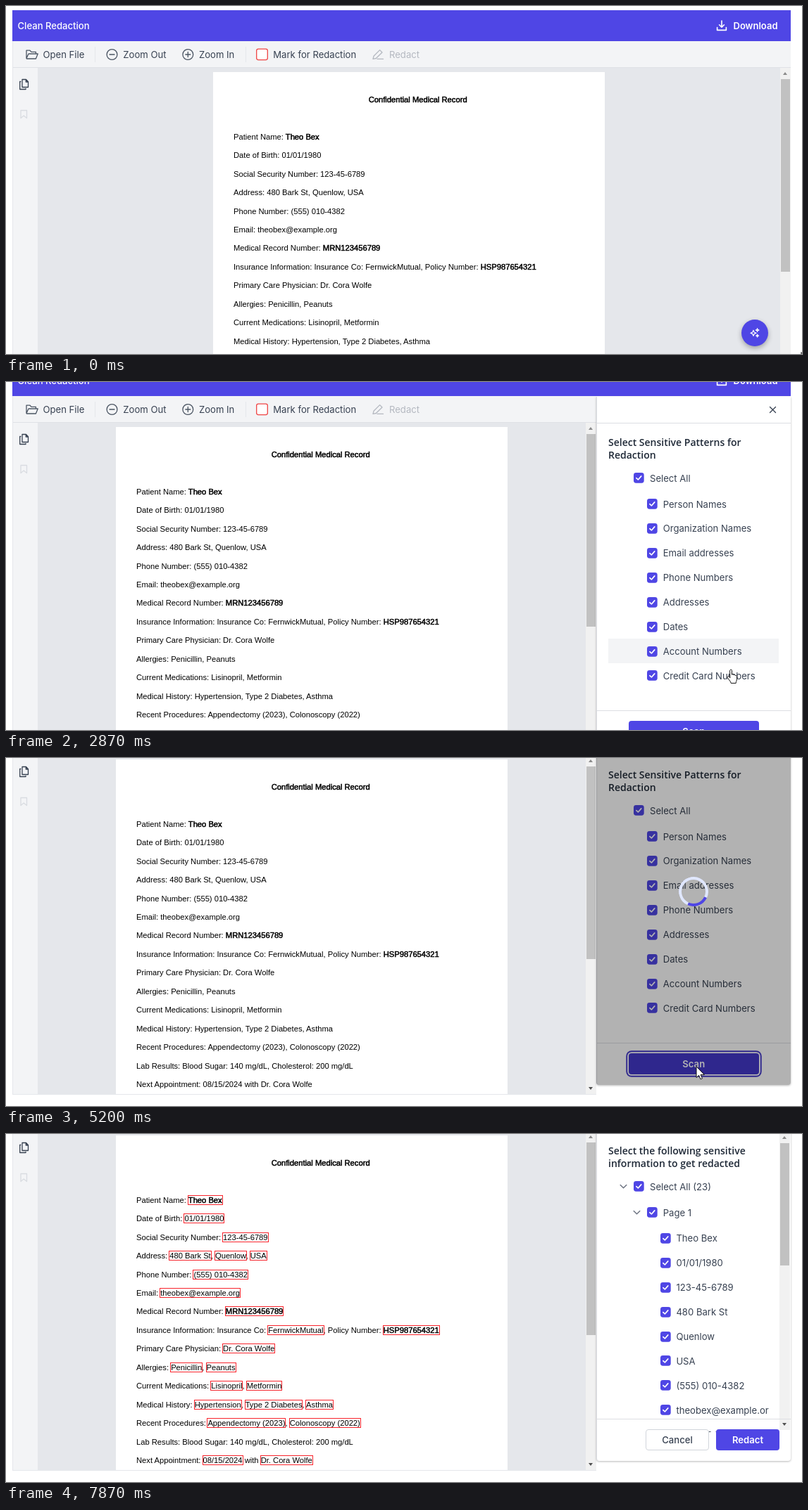
An HTML page that plays this animation: 1130 by 495 pixels, repeating every 8000 ms.

```html
<!DOCTYPE html>
<html lang="en">
<head>
<meta charset="utf-8">
<title>Redaction demo</title>
<style>
:root { --brand: #4f46e5; --dark: #4338ca; --line: #e5e7eb; --soft: #f3f4f6; --ink: #374151; }
html, body { margin: 0; width: 100%; height: 100%; overflow: hidden; background: #fff; }
body { position: relative; font: 13.1px Inter, sans-serif; color: var(--ink); }
* { box-sizing: border-box; }
svg { fill: none; stroke: currentColor; stroke-linecap: round; stroke-linejoin: round; overflow: visible; }
#app, #app > div, .abs { position: absolute; }
#app { left: 0; top: 0; width: 1130px; height: 700px; }

.header { left: 9px; top: 6px; width: 1105px; height: 44px; background: var(--brand); color: #fff; line-height: 44px; white-space: nowrap; }
.header span { position: absolute; font-weight: 500; }
.header .dl { font-weight: 600; font-size: 13px; }

.viewer { left: 9px; top: 50px; width: 1105px; height: 521px; background: #e5e7eb; overflow: hidden; border: solid var(--line); border-width: 0 0 1px 1px; }
.narrow .viewer { width: 829px; }
.tools { position: absolute; left: -1px; top: 0; width: 1105px; height: 38px; background: var(--soft); border-bottom: 1px solid #dfe1e6; line-height: 38px; white-space: nowrap; }
.tools span { position: absolute; }
.tools i { position: absolute; top: 8px; width: 1px; height: 22px; background: var(--line); }
.tools svg, .side svg { position: absolute; left: 0; top: 0; width: 1px; height: 1px; stroke-width: 1.3; color: #4b5563; }
.off { color: #b4b8c0; }
.side { position: absolute; left: -1px; top: 38px; width: 36px; height: 490px; background: var(--soft); }
.page { position: absolute; left: calc(50% - 268.5px); top: 44px; width: 556px; height: 720px; padding: 25.8px 0 0 29.5px; background: #fff; color: #000; font: 11.19px/26.45px "Liberation Sans", Arial, sans-serif; white-space: nowrap; }
.page div:first-child { padding-left: 191.7px; margin-bottom: 26.45px; }
.page b { font-weight: 400; -webkit-text-stroke: .5px #000; }
.page u { text-decoration: none; }
.done .page u { outline: 1px solid #f8232b; }

.bar { position: absolute; right: 0; width: 15px; background: #f1f1f1; }
.bar::before, .bar::after { content: ""; position: absolute; left: 4px; border: solid transparent; border-width: 0 3.5px; }
.bar::before { top: 6px; border-bottom: 4px solid #8a8a8a; }
.bar::after { bottom: 6px; border-top: 4px solid #505050; }
.bar i { position: absolute; left: 1px; right: 1px; top: 16px; background: #c1c1c1; }

.fab { left: 1044px; top: 445.5px; width: 38px; height: 38px; border-radius: 50%; background: var(--brand); color: #fff; box-shadow: 0 3px 7px rgba(0,0,0,.3); }
.over .fab { background: var(--dark); }
.focus .fab, .busy .scan { box-shadow: 0 0 0 1.84px #fff, 0 0 0 3.7px var(--dark); }

.panel { display: none; left: 838px; top: 51px; width: 276px; height: 506px; background: #fff; border-left: 1px solid #d9dbe0; border-radius: 0 0 4px 4px; box-shadow: 0 1px 3px rgba(0,0,0,.28); }
.open .panel { display: block; }
.panel > * { position: absolute; }
.rule { left: 0; width: 275px; height: 1px; background: #dcdee3; }
.list { left: -1px; top: 38px; width: 275px; height: 427px; overflow: hidden; white-space: nowrap; }
.list h2 { position: absolute; left: 17px; top: 18px; margin: 0; font: 600 14px/18px "Open Sans", "Noto Sans", sans-serif; color: #1f2937; white-space: pre; }
.row { position: absolute; left: 17px; width: 242px; height: 35px; display: flex; align-items: center; gap: 8px; }
.row svg { flex: none; width: 14.7px; height: 14.7px; }
.row .chev { position: absolute; margin-left: -22px; color: #6b7280; stroke-width: 1.4; }
.hover { background: var(--soft); }
.btn { top: 461px; height: 30px; border-radius: 4px; background: var(--brand); color: #fff; font-weight: 600; text-align: center; line-height: 30px; }
.scan { left: 45px; width: 184.5px; }
.scan.hot { background: var(--dark); }
.scan.press { background: #3730a3; }
.busy .scan { background: var(--dark); }
.cancel { left: 69px; width: 90px; background: #fff; color: var(--ink); border: 1px solid #d1d5db; font-weight: 500; line-height: 28px; }
.redact { left: 169px; width: 90px; }
.after, .done .before { display: none; }
.done .after { display: block; }
.veil { display: none; left: -1px; top: 0; width: 276px; height: 506px; background: rgba(0,0,0,.3); border-radius: 0 0 4px 4px; }
.spin { display: none; left: 116px; top: 210px; width: 42px; height: 42px; border: 4px solid #e0e7ff; border-top-color: var(--brand); border-radius: 50%; }
.busy .veil, .busy .spin { display: block; }
#cursor { position: absolute; left: 0; top: 0; width: 1px; height: 1px; fill: #fff; stroke: #111; stroke-width: 1; }
</style>
</head>
<body>
<div id="app">
  <div class="header">
    <span style="left:7.5px">Clean Redaction</span>
    <svg class="abs" style="left:1000px;top:15px" width="14" height="15" stroke-width="1.6"><path d="M7 0V9M3.6 5.8 7 9.2 10.4 5.8M.6 9.5V13.4H13.4V9.5"/></svg>
    <span class="dl" style="left:1023.5px">Download</span>
  </div>

  <div class="viewer">
    <div class="page" id="page"></div>
    <div class="side">
      <svg>
        <path stroke="#374151" d="M14 16.5H19.5L22.5 19.7V27.5H14ZM19.3 16.5V20H22.5"/>
        <path stroke="#374151" d="M11.8 19.5H10.7V30.5H19V29.5"/>
        <path stroke="#d9dce1" d="M12 60.5H20.5V71.5L16.2 68 12 71.5Z"/>
      </svg>
    </div>
    <div class="bar" style="top:38px;height:482px"><i style="height:274px"></i></div>
    <div class="tools">
      <svg>
        <path d="M20 24.5V13.2H25L27 15.4H33.4V18M20 24.5 23 18H36.2L33.4 25H20.3Z"/>
        <circle cx="141.5" cy="19" r="7.4"/><path d="M138 19H145"/>
        <circle cx="249.3" cy="19" r="7.4"/><path d="M245.8 19H252.8M249.3 15.5V22.5"/>
        <rect x="346.7" y="11.2" width="15.6" height="15.4" rx="2.5" fill="#fff" stroke="#ef4444"/>
        <path stroke="#b4b8c0" d="M512 25.3 513 21.3 521.6 12.6 525 16 516.3 24.5ZM518 25.4H526.5"/>
      </svg>
      <span style="left:43.5px">Open File</span><i style="left:117px"></i>
      <span style="left:157.3px">Zoom Out</span>
      <span style="left:265px">Zoom In</span><i style="left:331px"></i>
      <span style="left:370.3px">Mark for Redaction</span>
      <span class="off" style="left:535px">Redact</span>
    </div>
  </div>

  <div class="fab">
    <svg class="abs" style="left:12px;top:12px" width="14" height="14" stroke-width="1.2">
      <path d="M5 3.2 6.2 6 9 7.2 6.2 8.4 5 11.2 3.8 8.4 1 7.2 3.8 6ZM10.6.6 11.2 2.4 13 3 11.2 3.6 10.6 5.4 10 3.6 8.2 3 10 2.4ZM10.6 9 11.1 10.5 12.6 11 11.1 11.5 10.6 13 10.1 11.5 8.6 11 10.1 10.5Z"/>
    </svg>
  </div>

  <div class="panel">
    <div class="list before" id="patterns"></div>
    <div class="list after" id="found"></div>
    <svg style="left:245px;top:14px" width="9" height="9" stroke-width="1.3"><path d="M.5.5 8.5 8.5M8.5.5.5 8.5"/></svg>
    <div class="rule" style="top:37px"></div>
    <div class="rule" style="top:446px"></div>
    <div class="btn scan before" id="scan">Scan</div>
    <div class="btn cancel after">Cancel</div>
    <div class="btn redact after">Redact</div>
    <div class="veil"></div>
    <div class="spin" id="spin"></div>
  </div>
</div>
<svg id="cursor">
  <path id="arrow" d="M0 0V15.6L3.6 12.3 6 17.8 8.4 16.8 6.1 11.4H11Z"/>
  <path id="hand" transform="translate(-5.4)" d="M4 1.4C4-.4 6.9-.4 6.9 1.4V7.2C7.6 6.3 9.3 6.6 9.5 7.8 10.3 7.1 11.7 7.5 11.9 8.6 12.8 8.1 14 8.7 14 9.9V13.5C14 15.5 12.6 16.8 12.6 19.4H5.6C5.6 17.5 2.6 14.6.7 11.7-.3 10 1.9 8.9 3 10.2L4 11.5Z"/>
</svg>

<script>
const $ = id => document.getElementById(id);

// [..] marks sensitive text, *..* marks bold
const lines = [
  '*Confidential Medical Record*',
  'Patient Name: [*Theo Bex*]',
  'Date of Birth: [01/01/1980]',
  'Social Security Number: [123-45-6789]',
  'Address: [480 Bark St], [Quenlow], [USA]',
  'Phone Number: [(555) 010-4382]',
  'Email: [theobex@example.org]',
  'Medical Record Number: [*MRN123456789*]',
  'Insurance Information: Insurance Co: [FernwickMutual], Policy Number: [*HSP987654321*]',
  'Primary Care Physician: [Dr. Cora Wolfe]',
  'Allergies: [Penicillin], [Peanuts]',
  'Current Medications: [Lisinopril], [Metformin]',
  'Medical History: [Hypertension], [Type 2 Diabetes], [Asthma]',
  'Recent Procedures: [Appendectomy (2023)], [Colonoscopy (2022)]',
  'Lab Results: Blood Sugar: 140 mg/dL, Cholesterol: 200 mg/dL',
  'Next Appointment: [08/15/2024] with [Dr. Cora Wolfe]'
];
$('page').innerHTML = lines.map(s => '<div>' + s
  .replace(/\[(.+?)\]/g, '<u>$1</u>')
  .replace(/\*(.+?)\*/g, '<b>$1</b>') + '</div>').join('');

const tick = '<svg viewBox="0 0 15 15"><rect width="15" height="15" rx="3.5" fill="#4f46e5" stroke="none"/><path d="M4 7.8 6.5 10.2 11 5" stroke="#fff" stroke-width="1.7"/></svg>';
const chevron = '<svg class="chev"><path d="M3.2 5.5 7.5 9.8 11.8 5.5"/></svg>';
const row = (text, indent, y, open) =>
  `<div class="row" style="top:${y}px;padding-left:${indent}px">${open ? chevron : ''}${tick}<span>${text}</span></div>`;
const FIRST = 60, SECOND = 97, STEP = 34.9;

$('patterns').innerHTML = '<h2>Select Sensitive Patterns for\nRedaction</h2>' + row('Select All', 36.3, FIRST) +
  ['Person Names', 'Organization Names', 'Email addresses', 'Phone Numbers', 'Addresses', 'Dates', 'Account Numbers', 'Credit Card Numbers']
    .map((s, i) => row(s, 55, SECOND + i * STEP)).join('');

const items = [...document.querySelectorAll('.page u')].slice(0, 9).map(u => u.textContent.slice(0, 18));
$('found').innerHTML = '<h2>Select the following sensitive\ninformation to get redacted</h2>' +
  row('Select All (23)', 36.3, FIRST, true) + row('Page 1', 55, SECOND, true) +
  items.map((s, i) => row(s, 73.7, SECOND + 36.8 + i * STEP)).join('') +
  '<div class="bar" style="top:0;height:424px"><i style="height:174px"></i></div>';

const rows = $('patterns').querySelectorAll('.row');
const accountRow = rows[7], cardRow = rows[8];

// time, x, y of the pointer tip
const path = [
  [0, 1129, 493], [67, 1129, 493], [667, 1060, 460], [867, 1060, 460], [1133, 1053, 460],
  [2000, 1053, 460], [2067, 1005, 440], [2133, 957, 425], [2200, 1029, 409],
  [3467, 1029, 409], [3800, 980, 439], [6600, 980, 439], [7133, 600, 455],
  [7333, 387, 480], [7467, 250, 500], [8000, 250, 520]
];
function pointer(t) {
  const i = Math.max(1, path.findIndex(p => p[0] >= t));
  const [t0, x0, y0] = path[i - 1], [t1, x1, y1] = path[i];
  const k = (t - t0) / (t1 - t0);
  return [x0 + (x1 - x0) * k, y0 + (y1 - y0) * k];
}

const LOOP = 8000, FPS = 15;
function draw(time) {
  const t = Math.floor(time * FPS / 1000 + .06) * 1000 / FPS % LOOP;
  const from = e => t > e - 10;
  const between = (a, b) => from(a) && !from(b);
  const [x, y] = pointer(t);
  const overFab = !from(1400) && Math.hypot(x - 1063, y - 464.5) < 19;
  const hand = overFab || between(1400, 3133);

  const app = $('app'), flag = (el, name, on) => el.classList.toggle(name, on);
  flag(app, 'over', overFab);
  flag(app, 'focus', from(1200));
  flag(app, 'open', from(1400));
  flag(app, 'narrow', from(1467));
  flag(app, 'busy', between(4600, 7867));
  flag(app, 'done', from(7867));
  flag(cardRow, 'hover', between(1400, 2067));
  flag(accountRow, 'hover', between(2067, 3133));
  flag($('scan'), 'hot', from(3667));
  flag($('scan'), 'press', between(4400, 4600));

  const scroll = from(3000) ? 92 : from(2933) ? 78 : from(2867) ? 30 : 0;
  app.style.top = -scroll + 'px';
  $('spin').style.transform = `rotate(${(t - 4612) / 1325 * 360}deg)`;
  $('cursor').style.transform = `translate(${x}px, ${y}px)`;
  $('hand').style.display = hand ? '' : 'none';
  $('arrow').style.display = hand ? 'none' : '';
}

let start;
function loop(now) {
  start ??= now;
  draw((now - start) % LOOP);
  requestAnimationFrame(loop);
}
draw(0);
requestAnimationFrame(loop);
</script>
</body>
</html>
```
